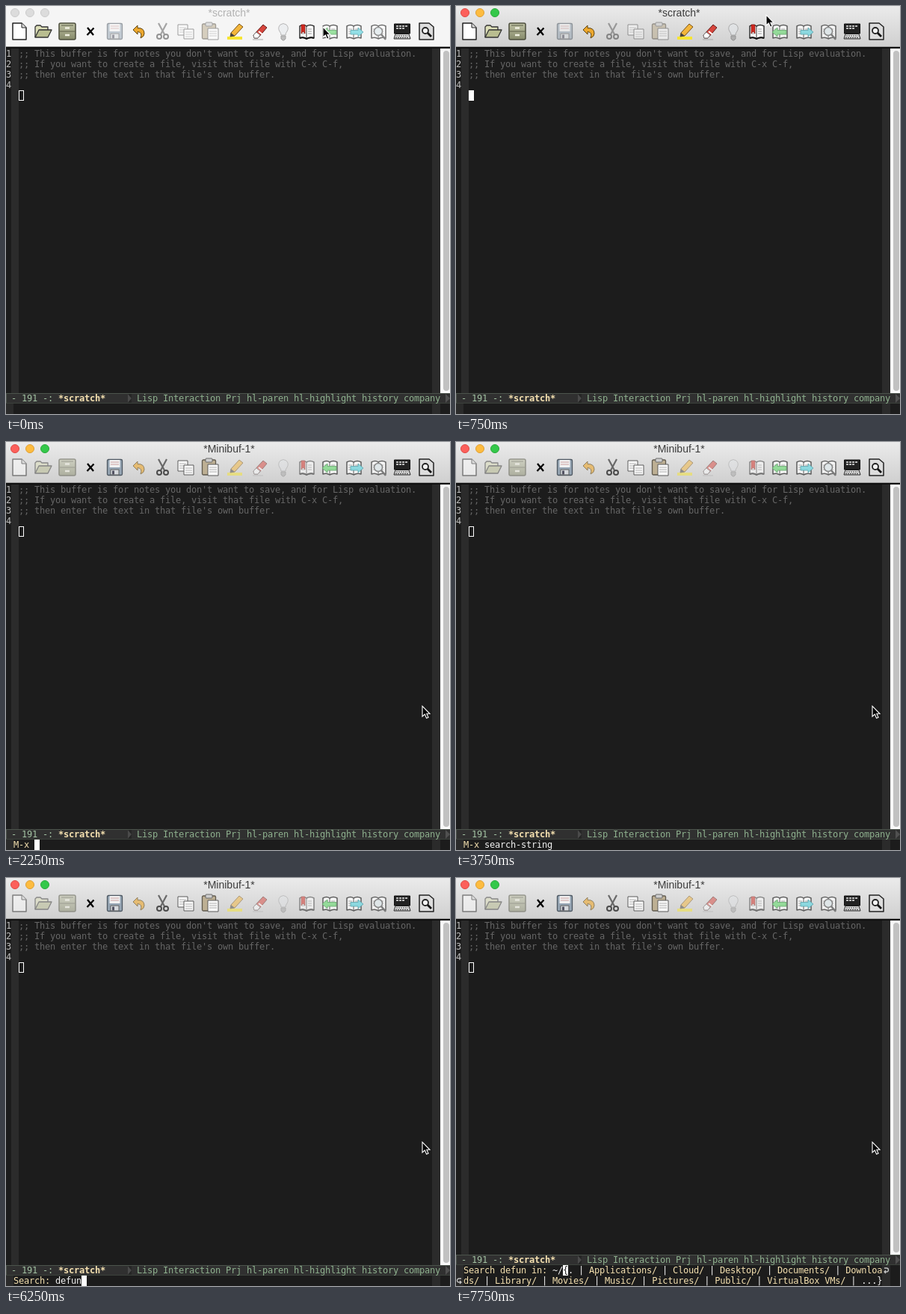
These frames come from a looping animation (594x547 px, 8 s). An HTML page:

```html
<!DOCTYPE html>
<html lang="en">
<head>
<meta charset="utf-8">
<title>Editor</title>
<style>
html, body { margin: 0; width: 100%; height: 100%; overflow: hidden; background: #1c1c1c; }
svg { display: block; width: 594px; height: 547px; }
text { font: 12px "DejaVu Sans Mono", monospace; letter-spacing: -.224px; white-space: pre; }
.title { font: 14px "Liberation Sans", Arial, sans-serif; letter-spacing: 0; text-anchor: middle; }
.bold { font-weight: bold; }
.cream { fill: #f5e1b0; }
.white { fill: #f4f4f4; }
.icon * { stroke-linejoin: round; }
</style>
</head>
<body>
<svg viewBox="0 0 594 547" xmlns="http://www.w3.org/2000/svg">
  <defs>
    <linearGradient id="bar" x2="0" y2="1">
      <stop offset="0" stop-color="#ebebeb"/><stop offset="1" stop-color="#cfcfcf"/>
    </linearGradient>
    <linearGradient id="metal" x2="0" y2="1">
      <stop offset="0" stop-color="#bfc2a4"/><stop offset="1" stop-color="#868a6a"/>
    </linearGradient>
    <g id="book">
      <path d="M1 4Q6 1 10 4Q15 1 20 4V20Q15 18 10 21Q6 18 1 20Z" fill="#fff" stroke="#333" stroke-width="1.5"/>
      <path d="M10 4V21" stroke="#333"/>
      <path d="M3 8h5M3 11h5M3 14h5M12 8h5M12 11h5M12 14h5" stroke="#999"/>
    </g>
  </defs>

  <rect width="594" height="547" fill="#1c1c1c"/>
  <rect id="top" width="594" height="55"/>
  <path d="M0 54.5H594" stroke="#9a9a9a"/>
  <path d="M0 56H594" stroke="#101010" stroke-width="2"/>
  <g id="lights"></g>
  <text id="title" class="title" x="298.5" y="14"></text>
  <g id="icons"></g>

  <rect x="7" y="57" width="10" height="462" fill="#2b2b2b"/>
  <rect x="570" y="57" width="11" height="462" fill="#2b2b2b"/>
  <rect x="581" y="57" width="13" height="462" fill="#fafafa"/>
  <rect id="thumb" x="585" y="60" width="8" rx="4" fill="#c1c1c1"/>
  <g id="page"></g>
  <rect id="point" x="17" y="113" width="7" height="14"/>

  <g id="foot">
    <rect y="519" width="594" height="42" fill="#1c1c1c"/>
    <rect y="533" width="10" height="28" fill="#2b2b2b"/>
    <rect x="570" y="533" width="11" height="28" fill="#2b2b2b"/>
    <rect y="519" width="594" height="14" fill="#303030"/>
    <path d="M163 520l5 6-5 6z" fill="#4a4a4a"/>
    <path d="M163 520h5v6zM163 532h5v-6z" fill="#262626"/>
    <path d="M588 520l6 6-6 6z" fill="#505050"/>
    <path d="M0 519.5H594M.5 519V533" stroke="#4c544c"/>
    <path d="M0 532.5H594" stroke="#3c423c"/>
    <text x="7" y="530" fill="#a3c3a3">- 191 -:</text>
    <text x="70" y="530" class="bold cream">*scratch*</text>
    <text x="175" y="530" fill="#8fb28f">Lisp Interaction Prj hl-paren hl-highlight history company</text>
  </g>
  <rect id="caret" width="7" height="14" fill="#fff"/>
  <g id="mini"></g>
  <g id="wrap" fill="none" stroke="#c4c4c4" stroke-width="1.3">
    <path d="M573 523h3a2 2 0 0 1 0 5h-3m2-2l-2 2 2 2"/>
    <path d="M7 537h-3a2 2 0 0 0 0 5h3m-2-2l2 2-2 2"/>
  </g>
  <path id="mouse" d="M1 1V15l3.3-3 2.3 5.3 2.4-1-2.2-5H11z" fill="#000" stroke="#fff" stroke-width="1.1"/>
</svg>
<script>
const LOOP = 8000, CELL = 7;
const $ = id => document.getElementById(id);
const set = (el, attrs) => { for (const k in attrs) el.setAttribute(k, attrs[k]); };
const show = (el, on) => set(el, { visibility: on ? 'visible' : 'hidden' });
const line = (x, y, s, cls) => `<text x="${x}" y="${y}" class="${cls}">${s}</text>`;

// x, y, opacity while the page has focus, opacity while the minibuffer has it, drawing
const icons = [
  [7, 22, 1, .5, `<path d="M2 1H14L20 7V23H2Z" fill="#fff" stroke="#222" stroke-width="1.5"/><path d="M14 1V7H20" fill="#ddd" stroke="#222"/>`],
  [38, 24, 1, .5, `<path d="M1 18V4L3 2H8L10 4H18V8" fill="#dcdeb8" stroke="#333" stroke-width="1.3"/><path d="M1 18L6 8H23L18 18Z" fill="#b9bd90" stroke="#333" stroke-width="1.3"/>`],
  [70, 22, 1, .5, `<rect x="1" y="1" width="22" height="22" rx="2" fill="url(#metal)" stroke="#4c4e3c" stroke-width="1.5"/><path d="M2 12H22M4 4H20" stroke="#5c5f48"/><path d="M9 7.5h6M9 17h6" stroke="#f1f1e2" stroke-width="2.4"/>`],
  [107, 28, 1, 1, `<path d="M2 1L10 11M10.500 1.500L1.500 11" stroke="#000" stroke-width="2.3"/>`],
  [134, 22, .5, .9, `<rect x="1.500" y="1.500" width="20" height="21" rx="1.500" fill="#8fa0b0" stroke="#3f4a55" stroke-width="1.3"/><rect x="4.500" y="2" width="14" height="10" fill="#f4f4f4"/><path d="M6 5h11M6 8h11" stroke="#c99"/><rect x="6" y="15" width="11" height="7" fill="#d5d9dd" stroke="#555"/><rect x="8" y="16.500" width="3" height="5" fill="#445"/>`],
  [168, 24, 1, .6, `<path d="M2 8L8 2V5.500Q17 5 17 13Q17 17 12 19Q15 11 8 10.500V14Z" fill="#eda82e" stroke="#5e4410"/>`],
  [200, 22, .5, .85, `<path d="M4 1L12 16M15 1L7 16" stroke="#555" stroke-width="2.2"/><circle cx="5" cy="19" r="3" fill="none" stroke="#333" stroke-width="2"/><circle cx="14" cy="19" r="3" fill="none" stroke="#333" stroke-width="2"/>`],
  [229, 24, .5, .85, `<path d="M1 1H14V15H1Z" fill="#fff" stroke="#444"/><path d="M3 5h9M3 8h9M3 11h9" stroke="#aaa"/><path d="M9 7H22V20H9Z" fill="#fff" stroke="#444"/><path d="M11 11h9M11 14h9M11 17h9" stroke="#aaa"/>`],
  [261, 21, .5, .85, `<rect x="1.500" y="3" width="18" height="20" rx="1.500" fill="#b9a988" stroke="#4b4436" stroke-width="1.3"/><rect x="6" y="1" width="9" height="5" rx="1" fill="#ccc" stroke="#555"/><path d="M9 9H23V24H9Z" fill="#fff" stroke="#444"/><path d="M11 13h10M11 16h10M11 19h10" stroke="#aaa"/>`],
  [295, 22, 1, .5, `<path d="M1 21H21" stroke="#f7e532" stroke-width="4"/><path d="M6 14L17 2L22 6L11 18L5 19Z" fill="#f3b63c" stroke="#775014"/><path d="M6 14L11 18L5 19Z" fill="#444"/>`],
  [329, 23, 1, .5, `<path d="M2 16L15 2L20 6L8 20L3 20Z" fill="#d8453c" stroke="#5d1c18"/><path d="M2 16L6 12L11 16L8 20H3Z" fill="#fff" stroke="#777"/><path d="M9 11l5 4" stroke="#fff" stroke-width="2"/><path d="M1 22H15" stroke="#aaa"/>`],
  [363, 22, .5, .3, `<path d="M5 17Q5 14 3 12Q0 7 4 3Q8 0 12 3Q16 7 13 12Q11 14 11 17Z" fill="#e4e8ec" stroke="#777"/><path d="M5 18h6v4l-2 2h-2l-2-2z" fill="#888" stroke="#555"/>`],
  [392, 23, 1, .5, `<use href="#book"/><path d="M3 2H8V14L5.500 11L3 14Z" fill="#d3281f" stroke="#7a130e" stroke-width=".7"/><path d="M1 20Q6 18 10 21Q15 18 20 20" fill="none" stroke="#111" stroke-width="2"/>`],
  [423, 23, .75, .75, `<use href="#book"/><path d="M0 12L7 6V9.500H19V15H7V18Z" fill="#7ddb84" stroke="#3d9448" stroke-width=".8"/>`],
  [455, 23, .75, .75, `<use href="#book"/><path d="M23 12L16 6V9.500H6V15H16V18Z" fill="#72d8e2" stroke="#318d98" stroke-width=".8"/>`],
  [488, 23, .7, .7, `<use href="#book"/><circle cx="10" cy="11" r="5.500" fill="#e2ecef" stroke="#666" stroke-width="1.500"/><path d="M14 15L20 22" stroke="#555" stroke-width="2.500"/>`],
  [518, 22, 1, 1, `<rect x="1.500" y="2" width="21" height="13" fill="#222" stroke="#111"/><path d="M4 5h16M4 8h12" stroke="#eee" stroke-width="1.500" stroke-dasharray="3 1"/><path d="M3 15.500H21L23 22H1Z" fill="#ddd" stroke="#222"/><path d="M4 18h16M3 20.500h18" stroke="#444" stroke-dasharray="2 1"/>`],
  [552, 22, 1, 1, `<path d="M1 1H14L20 6V23H1Z" fill="#ddd" stroke="#222" stroke-width="1.500"/><circle cx="9" cy="11" r="4" fill="#f4f4f4" stroke="#222" stroke-width="1.800"/><path d="M12 14L17 19" stroke="#111" stroke-width="2.800"/>`]
];
$('icons').innerHTML = icons.map(([x, y, , , art]) =>
  `<g class="icon" transform="translate(${x} ${y})">${art}</g>`).join('');

const lightColors = [['#fc605b', '#de4a45'], ['#fdbc40', '#de9f34'], ['#34c84a', '#29a93b']];
$('lights').innerHTML = lightColors.map((c, i) => `<circle cx="${12 + 20 * i}" cy="9" r="5.5"/>`).join('');

const notes = [
  ";; This buffer is for notes you don't want to save, and for Lisp evaluation.",
  ';; If you want to create a file, visit that file with C-x C-f,',
  ";; then enter the text in that file's own buffer.",
  ''
];
$('page').innerHTML = notes.map((s, i) => {
  const y = 68 + 14 * i;
  return `<text x="0" y="${y}" fill="#bdbdbd">${i + 1}</text><text x="17" y="${y}" fill="#666">${s}</text>`;
}).join('');

// start time, then the value held until the next entry
const at = (track, t) => track.reduce((v, e) => t >= e[0] ? e : v);
const mousePath = [[0, 423, 27], [250, 414, 14], [750, 414, 11], [1000, 473, 237], [1250, 536, 339], [1500, 556, 353]];
const keys = [5000, 5250, 5500, 6000, 6250];
const caretOn = [[0, 0], [2000, 1], [2500, 0], [3000, 1], [3750, 0], [4000, 1], [4750, 0],
  [5000, 1], [7250, 0], [7750, 1]];

// colours folder names differently from the marks between them
const paint = s => s.replace(/[A-Za-z][A-Za-z ]*\/?/g, m => `<tspan class="cream">${m}</tspan>`);
const folders = ['{. | Applications/ | Cloud/ | Desktop/ | Documents/ | Downloa',
  'ds/ | Library/ | Movies/ | Music/ | Pictures/ | Public/ | VirtualBox VMs/ | ...}'];

function prompt(t) {
  if (t < 2000) return { html: '', col: 0 };
  if (t < 4250) {
    const typed = t < 3250 ? '' : 'search-string';
    return { label: 'M-x ', typed, col: t < 4000 ? 4 : 0 };
  }
  if (t < 6750) {
    const typed = 'defun'.slice(0, keys.filter(k => t >= k).length);
    return { label: 'Search: ', typed, col: 8 + typed.length };
  }
  return { label: 'Search defun in: ', typed: '~/', col: 19, list: true };
}

let last = '';
function drawMini(t) {
  const { label = '', typed = '', col, list } = prompt(t);
  const on = at(caretOn, t)[1], x = 10 + CELL * col, y = list ? 519 : 533;
  let html = line(10, y + 11, label, 'cream') + line(10 + CELL * label.length, y + 11, typed, 'white');
  if (list) {
    html += line(x, 530, paint(folders[0]), 'white') + line(10, 544, paint(folders[1]), 'white');
  }
  const under = (label + typed + (list ? '{' : ''))[col];
  if (on && under) {
    html += `<rect x="${x}" y="${y}" width="7" height="14" fill="#fff"/><text x="${x}" y="${y + 11}" fill="#1c1c1c">${under}</text>`;
  }
  if (html !== last) $('mini').innerHTML = last = html;
  set($('caret'), { x, y });
  show($('caret'), on);
  show($('wrap'), list);
  set($('foot'), { transform: `translate(0 ${list ? -14 : 0})` });
  set($('thumb'), { height: list ? 442 : 456 });
}

function draw(t) {
  const active = t >= 750, mini = t >= 2000;
  set($('top'), { fill: active ? 'url(#bar)' : '#f5f5f5' });
  [...$('lights').children].forEach((c, i) => {
    const [fill, stroke] = active ? lightColors[i] : ['#dcdcdc', '#cbcbcb'];
    set(c, { fill, stroke });
  });
  $('title').textContent = mini ? '*Minibuf-1*' : '*scratch*';
  set($('title'), { fill: active ? '#3c3c3c' : '#b2b2b2' });
  [...$('icons').children].forEach((g, i) => set(g, { opacity: icons[i][t < 2250 ? 2 : 3] }));

  const solid = active && !mini;
  set($('point'), solid
    ? { x: 17, y: 113, width: 7, height: 14, fill: '#fff', stroke: 'none' }
    : { x: 17.5, y: 113.5, width: 6, height: 13, fill: 'none', stroke: '#fff' });
  show($('point'), t < 1250 || t >= 1750);

  const [, mx, my] = at(mousePath, t);
  set($('mouse'), { transform: `translate(${mx} ${my})` });
  drawMini(t);
}

const start = performance.now();
function tick() {
  draw((performance.now() - start) % LOOP);
  requestAnimationFrame(tick);
}
tick();
</script>
</body>
</html>
```
